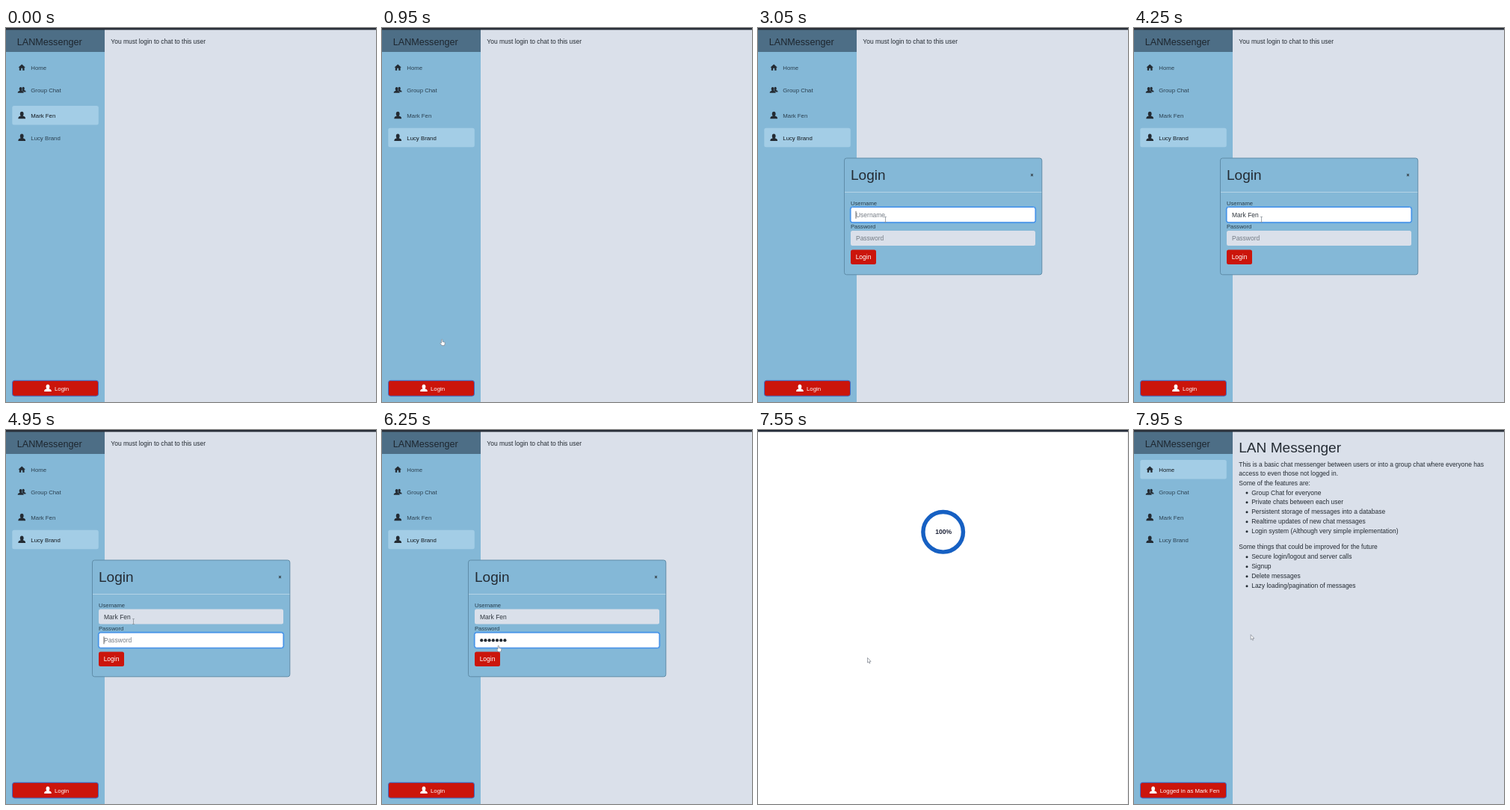
Write an HTML page with a canvas that moves like this. It is 495 by 500 pixels and loops after 8000 ms.

```html
<!DOCTYPE html>
<html lang="en">
<head>
<meta charset="utf-8">
<title>LANMessenger</title>
<style>
html, body { margin: 0; width: 100%; height: 100%; overflow: hidden; }
canvas { display: block; width: 495px; height: 500px; }
</style>
</head>
<body>
<canvas id="stage"></canvas>
<script>
const W = 495, H = 500, LOOP = 8000;
const FONT = '"Liberation Sans", Arial, sans-serif';
const BODY = 8.47, SMALL = 7.8;
const SKY = '#84b8d7', PALE = '#a3cde6', PAGE = '#dae0ea', INK = '#242b33';
const RED = '#cb150b', BLUE = '#0059dc', EDGE = '#3a6cc8';
const USER = 'Mark Fen', PEER = 'Lucy Brand';

// moments of the session, in ms
const T = {
  pickPeer: 550, open: 1200, unfocus: 2350, focusUser: 2600,
  typeUser: 3450, focusPass: 4600, typePass: 5150,
  press: 6500, done: 6650, reload: 7200, layout: 7600, home: 7700
};

const canvas = document.getElementById('stage');
const ratio = window.devicePixelRatio || 1;
canvas.width = W * ratio;
canvas.height = H * ratio;
const c = canvas.getContext('2d');

const clamp = (v, a, b) => Math.min(b, Math.max(a, v));
const ease = p => p * p * (3 - 2 * p);

function fill(x, y, w, h, color) {
  c.fillStyle = color;
  c.fillRect(x, y, w, h);
}

function box(x, y, w, h, color, border, radius = 2.5) {
  c.beginPath();
  c.roundRect(x, y, w, h, radius);
  c.fillStyle = color;
  c.fill();
  if (border) {
    c.strokeStyle = border;
    c.lineWidth = 1;
    c.stroke();
  }
}

function dot(x, y, r, color) {
  c.beginPath();
  c.arc(x, y, r, 0, 7);
  c.fillStyle = color;
  c.fill();
}

// y is the middle of the capitals
function text(str, x, y, size = BODY, color = INK, weight = 400, align = 'left') {
  c.font = `${weight} ${size}px ${FONT}`;
  c.textAlign = align;
  c.fillStyle = color;
  c.fillText(str, x, y + size * 0.36);
}

function textWidth(str, size) {
  c.font = `400 ${size}px ${FONT}`;
  return c.measureText(str).width;
}

function person(x, y, color, s = 1) {
  c.save();
  c.translate(x, y);
  c.scale(s, s);
  c.fillStyle = color;
  c.beginPath();
  c.ellipse(0, -1.9, 2.4, 2.9, 0, 0, 7);
  c.fill();
  c.fill(new Path2D('M-4.8 4.6V3.4Q-4.6 2 -1.5 1V0H1.5V1Q4.6 2 4.8 3.4V4.6Z'));
  c.restore();
}

function group(x, y) {
  person(x + 1.9, y - 0.3, INK, 0.72);
  person(x - 1.5, y + 0.3, SKY, 1);
  person(x - 1.5, y + 0.3, INK, 0.82);
}

function house(x, y) {
  c.fillStyle = INK;
  c.fill(new Path2D(
    `M${x - 4.7} ${y + 0.2}l4.7 -4.4l4.7 4.4h-1.3v4h-2.4v-3h-2v3h-2.4v-4z`));
}

const user = (x, y) => person(x, y, INK);
const items = [
  { label: 'Home', y: 53, icon: house },
  { label: 'Group Chat', y: 83, icon: group },
  { label: USER, y: 117, icon: user },
  { label: PEER, y: 146.7, icon: user }
];

function sidebar(active) {
  fill(0, 0, W, H, PAGE);
  fill(0, 0, 132, H, SKY);
  fill(0, 0, 132, 32, '#4d6e86');
  fill(0, 0, W, 2.5, '#292f39');
  text('LANMessenger', 14.8, 18.4, 12.6, '#1d262f');
  items.forEach((item, i) => {
    if (i === active) box(8.3, item.y - 13, 115.5, 25.6, PALE);
    item.icon(21.2, item.y - 0.4);
    text(item.label, 33.3, item.y + 0.3, SMALL, i === active ? '#12181e' : '#2b4050');
  });
}

function accountButton(label, focused) {
  if (focused) {
    box(6.3, 469.3, 119.4, 25.2, '#5f9fdf', null, 4);
    box(8, 471, 116, 22, BLUE, '#0650c0', 3);
    return;
  }
  box(8.5, 471.3, 115, 20.8, RED, EDGE, 3);
  const left = (132 - textWidth(label, SMALL)) / 2 + 8.5;
  person(left - 9, 481.3, '#fff');
  text(label, left, 482, SMALL, '#fff');
}

function field(y, value, hint, caret, masked) {
  const focused = caret >= 0;
  if (focused) {
    box(122.7, y - 1.4, 249.6, 23, '#5fa6e6', null, 4);
    box(124, y, 247, 20.2, '#fff', '#2f82e6');
  } else {
    box(124, y, 247, 20, PAGE);
  }
  const mid = y + 10.2;
  let end = 131;
  if (masked) {
    for (let i = 0; i < value.length; i++) dot(133.2 + i * 5.2, mid, 2.1, INK);
    end += value.length * 5.2;
  } else if (value) {
    text(value, 131, mid, BODY, '#30373f');
    end += textWidth(value, BODY);
  }
  if (!value) text(hint, 131, mid, BODY, '#757c85');
  if (focused && caret % 1000 < 500) fill(end - 0.4, mid - 5, 0.8, 10, '#444');
}

function smallButton(label, y, width, focused) {
  if (focused) {
    box(122.4, y - 1.7, width + 3.3, 22.8, '#d8ecfa', null, 4);
    box(123.2, y - 0.9, width + 1.7, 21.2, '#2f7ddd', null, 3);
  }
  box(124, y, width, 19.5, focused ? BLUE : RED);
  text(label, 124 + width / 2, y + 9.8, BODY, '#fff', 400, 'center');
}

// time since focus, or -1 when the field is not focused
const focusAge = (t, from, to) => t >= from && t < to ? t - from : -1;
const typedCount = (t, from, max) => clamp(Math.floor((t - from) / 110) + 1, 0, max);

function dialog(t) {
  const done = t >= T.done;
  const top = done ? 158.5 : 174;
  const typed = typedCount(t, T.typeUser, USER.length);
  const secret = typedCount(t, T.typePass, 7);

  box(115.5, top, 264.3, done ? 186.7 : 155.8, SKY, '#5f8ca8', 3);
  text('Login', 124, top + 22.2, 19, INK);
  text('×', 366.6, top + 22.3, 6.8, '#222', 700, 'center');
  fill(116, top + 45, 263.3, 1, '#b4d4e6');

  text('Username', 124, top + 60.1, 7.6, '#253b4a');
  field(top + 65.6, USER.slice(0, typed), 'Username',
    focusAge(t, T.focusUser, T.focusPass));
  text('Password', 124, top + 91.4, 7.6, '#253b4a');
  field(top + 97, '*'.repeat(secret), 'Password',
    focusAge(t, T.focusPass, T.press), true);

  smallButton('Login', top + 122.4, 34, t >= T.press);
  if (done) {
    text('Login Successful', 162.7, top + 131.8, 7.55, '#3b5d72');
    smallButton('Logout', top + 153, 39, false);
  }
}

function ring(part, color) {
  c.lineWidth = 5.4;
  c.strokeStyle = color;
  c.beginPath();
  c.arc(247.7, 136.3, 26.8, -Math.PI / 2, Math.PI * (2 * part - 0.5));
  c.stroke();
}

function loader(t) {
  fill(0, 0, W, H, '#fff');
  fill(494, 0, 1, H, '#ececef');
  fill(0, 0, W, 2.5, '#242b39');
  const start = T.reload + 50;
  if (t < start) return;
  const part = clamp((t - start) / 250, 0, 1);
  ring(1, '#e4e8ee');
  ring(part, '#1660c3');
  text(Math.round(part * 100) + '%', 248.2, 136.3, 8.6, '#20263a', 700, 'center');
}

function bullets(lines, y) {
  lines.forEach((line, i) => {
    dot(151, y + i * 12.95 + 0.4, 1.5, INK);
    text(line, 157.2, y + i * 12.95);
  });
}

function homePage() {
  text('LAN Messenger', 140.2, 23, 19.1);
  text('This is a basic chat messenger between users or into a group chat where everyone has', 140.3, 45.5);
  text('access to even those not logged in.', 140.3, 58.2);
  text('Some of the features are:', 140.3, 70.9);
  bullets(['Group Chat for everyone', 'Private chats between each user',
    'Persistent storage of messages into a database',
    'Realtime updates of new chat messages',
    'Login system (Although very simple implementation)'], 83.5);
  text('Some things that could be improved for the future', 140.3, 156.4);
  bullets(['Secure login/logout and server calls', 'Signup',
    'Delete messages', 'Lazy loading/pagination of messages'], 169.4);
}

// pointer stops: time, x, y
const track = [
  [250, 84, 120], [450, 72, 147], [700, 72, 147], [1050, 80, 481],
  [1250, 80, 481], [1500, 138, 363], [1850, 138, 363], [2350, 170.5, 251.5],
  [6000, 170.5, 251.5], [6400, 146.5, 304.5], [7650, 146.5, 304.5], [7900, 156.2, 273.6]
];

function pointerAt(t) {
  let i = 0;
  while (i < track.length - 2 && t > track[i + 1][0]) i++;
  const [a, b] = [track[i], track[i + 1]];
  const p = ease(clamp((t - a[0]) / (b[0] - a[0]), 0, 1));
  return [a[1] + (b[1] - a[1]) * p, a[2] + (b[2] - a[2]) * p];
}

const ARROW = new Path2D('M0 0V6.6L1.5 5.3L2.5 7.6L3.5 7.1L2.6 4.9H4.6Z');
const HAND = new Path2D('M1 .8Q1.8 -.2 2.5 .8V3.4L5.4 4.2Q6 4.5 5.8 5.4L5.1 8.6H1.8L-.8 5.6Q-.4 4.5 1 5.3Z');

function pointer(t) {
  if (t < track[0][0]) return;
  const [x, y] = pointerAt(t);
  c.save();
  c.translate(x, y);
  if (t > 2300 && t < 6150) {
    fill(-0.4, 1, 0.8, 7, '#8a929b');
    fill(-1.5, 0.6, 3, 0.7, '#8a929b');
    fill(-1.5, 7.6, 3, 0.7, '#8a929b');
  } else {
    const onLink = t < 1300 || t > 6250 && t < T.reload;
    const shape = onLink ? HAND : ARROW;
    c.fillStyle = '#fff';
    c.fill(shape);
    c.lineWidth = 0.7;
    c.strokeStyle = '#7b828b';
    c.stroke(shape);
  }
  c.restore();
}

function draw(t) {
  c.setTransform(ratio, 0, 0, ratio, 0, 0);
  if (t >= T.reload && t < T.layout) {
    loader(t);
  } else if (t >= T.layout) {
    sidebar(0);
    const ready = t >= T.home;
    if (ready) homePage();
    accountButton(ready ? 'Logged in as ' + USER : 'Login');
  } else {
    sidebar(t < T.pickPeer ? 2 : 3);
    text('You must login to chat to this user', 140.3, 18.4);
    accountButton(t >= T.done ? 'Logged in as ' + USER : 'Login',
      t >= T.open - 100 && t < T.unfocus);
    if (t >= T.open) dialog(t);
  }
  pointer(t);
}

function tick(now) {
  draw(now % LOOP);
  requestAnimationFrame(tick);
}
requestAnimationFrame(tick);
</script>
</body>
</html>
```
